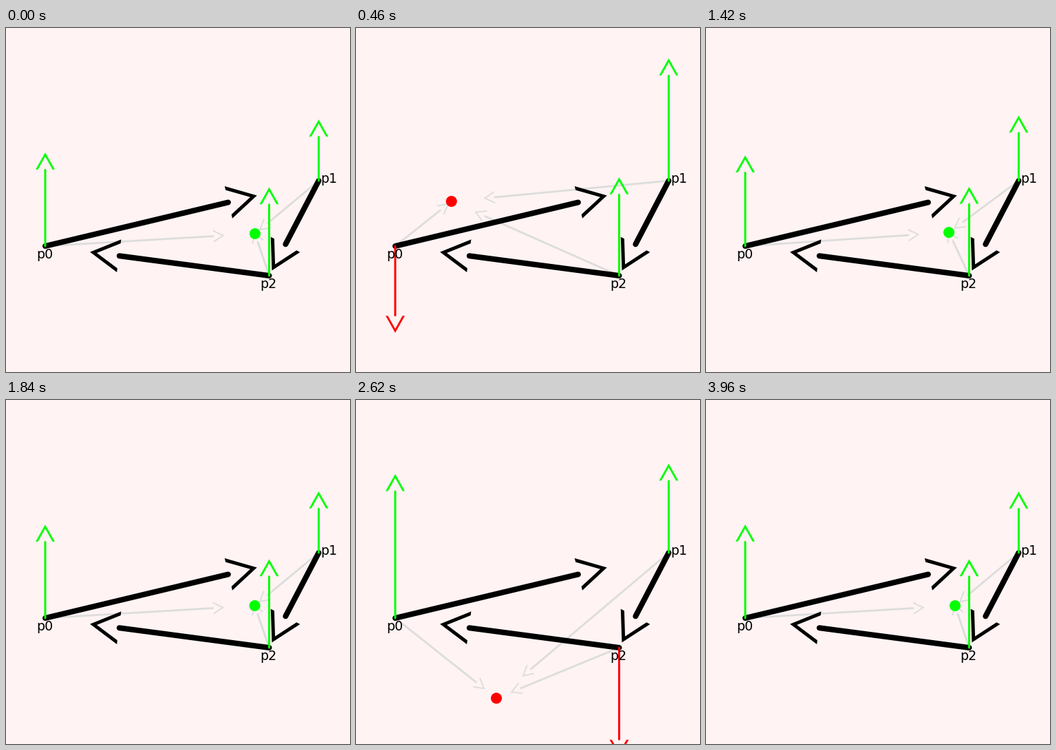
Write a matplotlib script that moves like this. It is 500 px wide and 500 px high and loops after 4000 ms.

```python
import numpy as np
import matplotlib.pyplot as plt
from matplotlib.animation import FuncAnimation
from matplotlib.patches import Circle, Polygon

SIZE, DPI = 500, 100
FRAMES, INTERVAL = 200, 20
LEG = 50
PX = 72 / DPI

BACK, GRAY, GREEN, RED = "#fff3f3", "#dcdcdc", "#00ff00", "#ff0000"

CORNERS = np.array([(57, 317), (454.5, 222), (382.5, 360)])
EDGES = np.roll(CORNERS, -1, axis=0) - CORNERS
HOME = np.array([362, 299])
LEFT = HOME + np.array([-229, -48.2])
LOW = HOME + np.array([-159.4, 135.7])
STOPS = [HOME, LEFT, HOME, LOW, HOME]

# quick start, long settling tail
EASE_T = np.array([0, 4, 8, 12, 21, 23, 31, 49])
EASE_V = np.array([0, .17, .598, .862, .961, .975, .991, 1])


def hermite_slopes(x, y):
    d = np.diff(y) / np.diff(x)
    m = np.zeros(len(x))
    m[1:-1] = 2 * d[:-1] * d[1:] / (d[:-1] + d[1:])
    return m


EASE_M = hermite_slopes(EASE_T, EASE_V)


def ease(t):
    i = min(np.searchsorted(EASE_T, t, side="right") - 1, len(EASE_T) - 2)
    h = EASE_T[i + 1] - EASE_T[i]
    u = (t - EASE_T[i]) / h
    return ((1 + 2 * u) * (1 - u) ** 2 * EASE_V[i] + u * (1 - u) ** 2 * h * EASE_M[i]
            + u * u * (3 - 2 * u) * EASE_V[i + 1] + u * u * (u - 1) * h * EASE_M[i + 1])


def probe_at(frame):
    leg, t = divmod(frame, LEG)
    return STOPS[leg] + (STOPS[leg + 1] - STOPS[leg]) * ease(t)


fig = plt.figure(figsize=(SIZE / DPI, SIZE / DPI), dpi=DPI, facecolor=BACK)
ax = fig.add_axes([0, 0, 1, 1])
ax.set(xlim=(0, SIZE), ylim=(SIZE, 0))
ax.axis("off")


class Arrow:
    """Round-capped shaft with an open triangular head beyond its end."""

    def __init__(self, color, width, head, stroke, z):
        self.shaft, = ax.plot([], [], color=color, lw=width * PX, snap=False,
                              solid_capstyle="round", zorder=z)
        self.head = ax.add_patch(Polygon([(0, 0)] * 6, fc=color, ec="none",
                                         snap=False, zorder=z))
        half = head * .565
        inner = half - stroke * 2 / np.sqrt(3)
        self.shape = np.array([(0, -half), (head, 0), (0, half),
                               (0, inner), (head - 2 * stroke, 0), (0, -inner)])
        self.shape[:, 0] += .5

    def place(self, start, vec):
        end = start + vec
        self.shaft.set_data(*zip(start, end))
        ux, uy = vec / max(np.hypot(*vec), 1e-9)
        self.head.set_xy(end + self.shape @ np.array([(ux, uy), (-uy, ux)]))

    def paint(self, color):
        self.shaft.set_color(color)
        self.head.set_facecolor(color)


sights = [Arrow(GRAY, 2.7, 16, 1.8, 1) for _ in CORNERS]
sides = [Arrow("black", 8, 42.5, 5, 2) for _ in CORNERS]
normals = [Arrow(GREEN, 3, 24.7, 2.9, 3) for _ in CORNERS]
probe = ax.add_patch(Circle(HOME, 8, ec="none", zorder=4))

for side, corner, edge in zip(sides, CORNERS, EDGES):
    side.place(corner, edge * .669)

LABELS = [("p0", 46, 335), ("p1", 459, 225), ("p2", 371, 378)]
for text, x, y in LABELS:
    ax.text(x - 1.5, y, text, fontsize=19 * PX, family="DejaVu Sans",
            va="baseline", zorder=5)


def update(frame):
    point = probe_at(frame)
    rays = point - CORNERS
    cross = EDGES[:, 0] * rays[:, 1] - EDGES[:, 1] * rays[:, 0]
    for i, c in enumerate(cross):
        sights[i].place(CORNERS[i], rays[i] * .8)
        rise = -np.sign(c) * .75 * np.sqrt(abs(c))
        normals[i].place(CORNERS[i], np.array([0, rise]))
        normals[i].paint(GREEN if c >= 0 else RED)
    probe.center = point
    probe.set_facecolor(GREEN if cross.min() >= 0 else RED)
    return []


anim = FuncAnimation(fig, update, frames=FRAMES, interval=INTERVAL,
                     repeat=True, repeat_delay=0)
plt.show()
```
